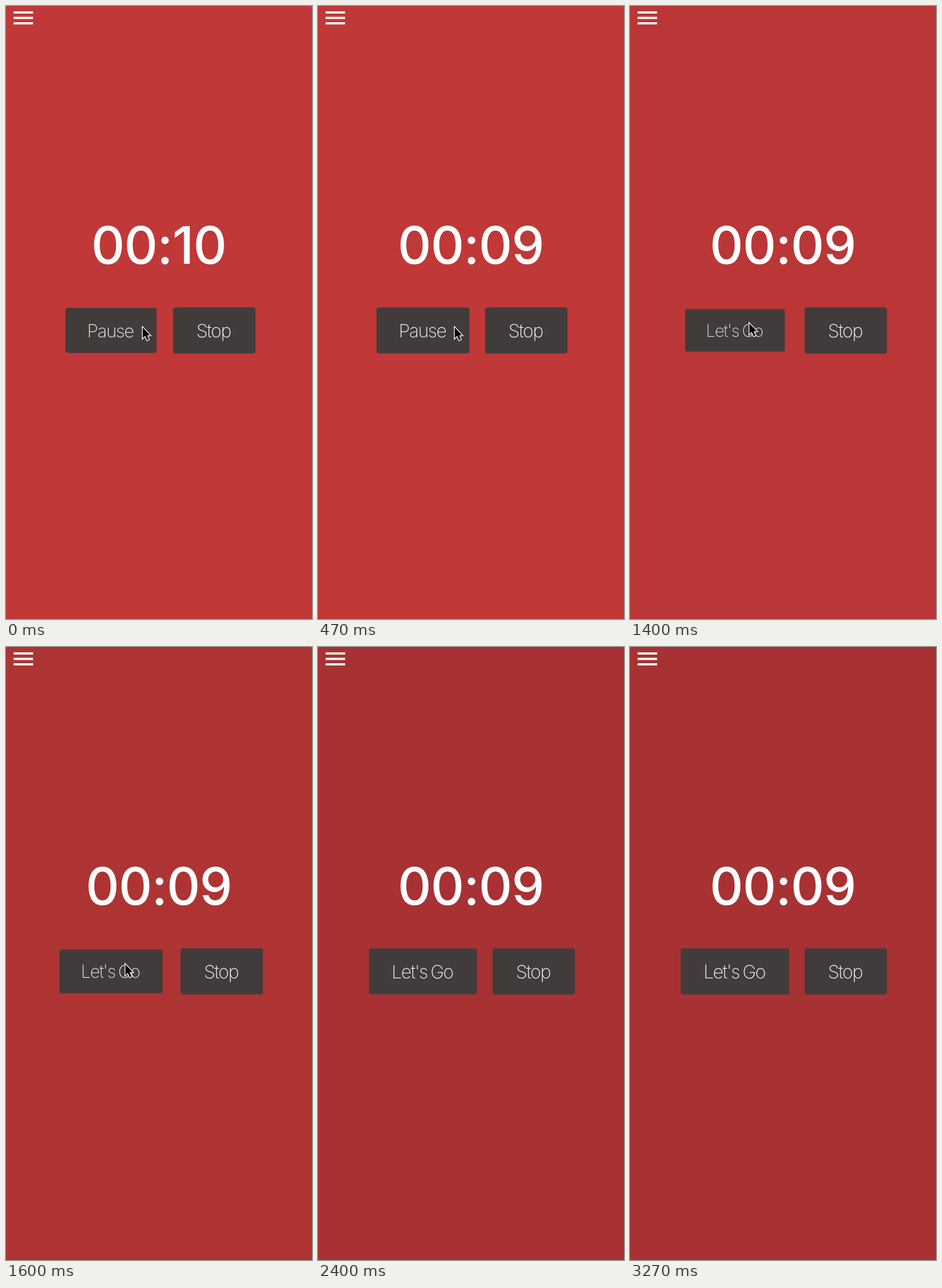
An HTML page with a canvas for the animation above (3.34 s loop, 529 px wide and 1058 px high).

```html
<!DOCTYPE html>
<html lang="en">
<head>
<meta charset="utf-8">
<title>Timer</title>
<style>
html, body { margin: 0; width: 100%; height: 100%; overflow: hidden; background: #c03838; }
canvas { display: block; width: 529px; height: 1058px; }
</style>
</head>
<body>
<canvas id="stage" width="529" height="1058"></canvas>
<script>
const ctx = document.getElementById('stage').getContext('2d');
const W = 529, H = 1058, LOOP = 3340, STEP = 200 / 3;
const TICK = 440, TOGGLE = 1325;
const FONT = 'Inter, Roboto, sans-serif';
const RUNNING = [192, 56, 56], PAUSED = [168, 50, 51];

const clamp = x => Math.min(1, Math.max(0, x));
const smooth = x => x * x * (3 - 2 * x);
const easeOut = x => 1 - Math.pow(1 - x, 2.1);
const mix = (a, b, p) => a + (b - a) * p;

function text(str, x, y, size, weight, spacing) {
  ctx.font = `${weight} ${size}px ${FONT}`;
  ctx.letterSpacing = spacing + 'px';
  ctx.wordSpacing = '-2px';
  ctx.textAlign = 'center';
  ctx.fillText(str, x + spacing / 2, y);
}

// dip: how far the button is below full size
function button(label, cx, w, dip = 0) {
  const h = 79.8;
  ctx.save();
  ctx.translate(cx, 559.9);
  ctx.scale(1 - dip, 1 - dip);
  ctx.beginPath();
  ctx.roundRect(-w / 2, -h / 2, w, h, 4);
  ctx.fillStyle = '#423b3b';
  ctx.fill();
  ctx.beginPath();
  ctx.roundRect(-w / 2 + 0.5, -h / 2 + 0.5, w - 1, h - 1, 3.5);
  ctx.strokeStyle = 'rgba(100, 58, 58, .4)';
  ctx.lineWidth = 1;
  ctx.stroke();
  ctx.fillStyle = `rgba(255, 255, 255, ${0.94 - 2 * dip})`;
  text(label, -0.4, 12.1, 32, 200, -1.6);
  ctx.restore();
}

function menu() {
  ctx.fillStyle = '#fff';
  for (let i = 0; i < 3; i++) ctx.fillRect(13.1, 9.3 + 9.35 * i, 33.7, 3.75);
}

function cursor(x, y) {
  ctx.save();
  ctx.translate(x, y);
  ctx.beginPath();
  ctx.moveTo(0.3, 0.8);
  for (const [px, py] of [[0.3, 19.5], [4.6, 15.6], [8, 23], [11, 21.7], [7.8, 14.4], [13.2, 14.2]]) ctx.lineTo(px, py);
  ctx.closePath();
  ctx.lineWidth = 2.6;
  ctx.strokeStyle = '#fff';
  ctx.stroke();
  ctx.fillStyle = '#000';
  ctx.fill();
  ctx.restore();
}

function drawCursor(t) {
  const p = smooth(clamp((t - 560) / 330));
  const leave = Math.max(0, (t - 1700) / 100) ** 2;
  if (leave < 2.5) cursor(mix(236, 206, p) + 127 * leave, mix(554, 547, p) - 155 * leave);
}

function draw(t) {
  const paused = t >= TOGGLE;
  const since = paused ? t - TOGGLE : t + 525;
  const dip = 0.098 * Math.exp(-since * 0.00245);
  const shade = easeOut(clamp((t - TOGGLE) / 570));

  ctx.fillStyle = '#c07070';
  ctx.fillRect(0, 0, W, H);
  ctx.fillStyle = `rgb(${RUNNING.map((c, i) => Math.round(mix(c, PAUSED[i], shade))).join()})`;
  ctx.beginPath();
  ctx.roundRect(0, 0, W, H, [3, 3, 0, 0]);
  ctx.fill();

  menu();
  ctx.fillStyle = '#fff';
  text(t < TICK ? '00:10' : '00:09', 264.6, 444.8, 90, 500, -1.1);
  if (paused) button("Let's Go", 181.5, 187.8, dip);
  else button('Pause', 181.5, 162, dip);
  button('Stop', paused ? 373 : 360, 142.4);
  drawCursor(t);
}

function frame(now) {
  const t = now % LOOP;
  draw(Math.min(49, Math.floor((t + 4) / STEP)) * STEP);
  requestAnimationFrame(frame);
}
requestAnimationFrame(frame);
</script>
</body>
</html>
```
